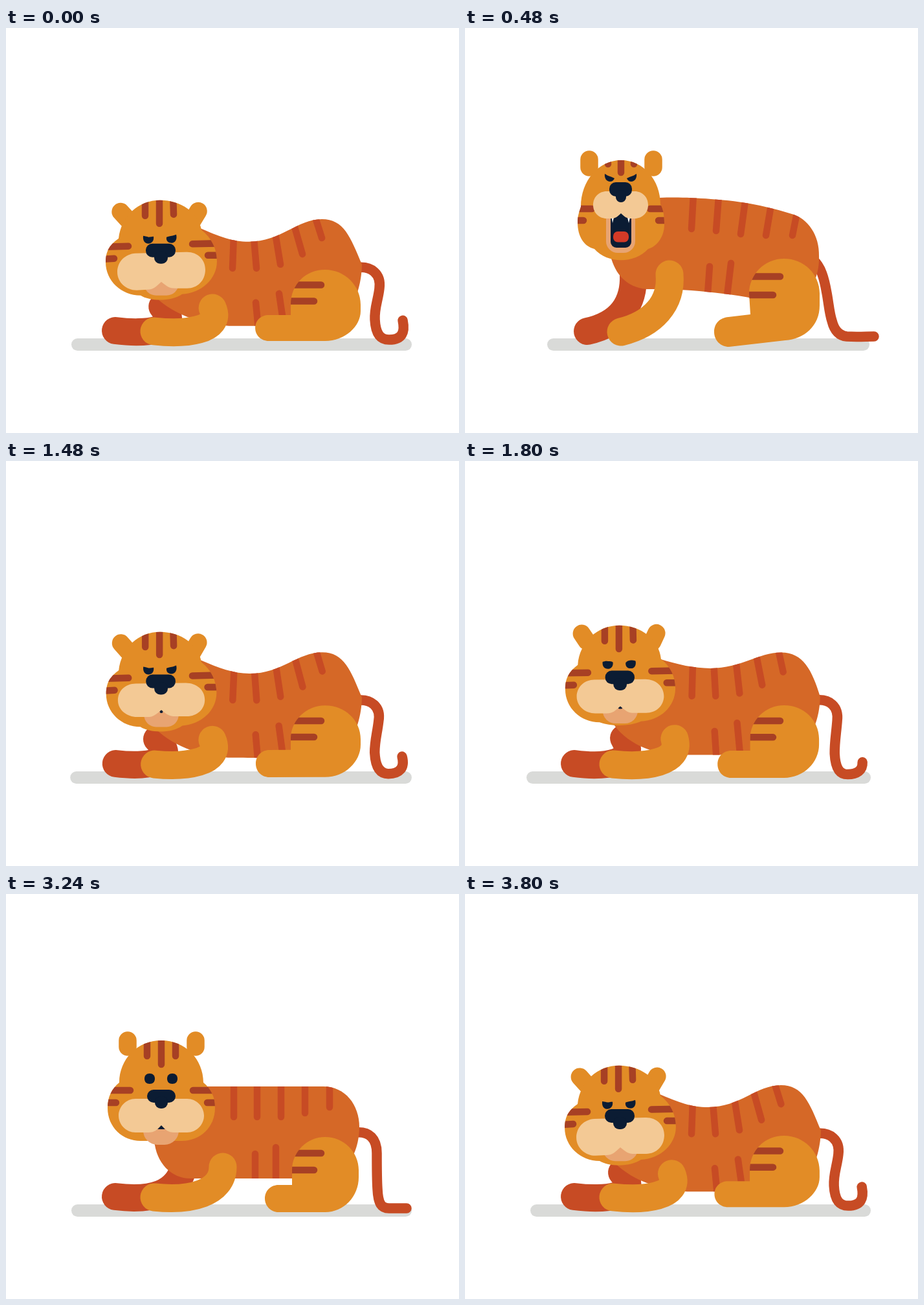
Animation of 700x625 px, one loop 3840 ms. Source, as an HTML page with a canvas:

```html
<!DOCTYPE html>
<html lang="en">
<head>
<meta charset="utf-8">
<title>Tiger</title>
<style>
html, body { margin: 0; overflow: hidden; background: #fff; }
canvas { display: block; }
</style>
</head>
<body>
<canvas id="stage" width="700" height="625"></canvas>
<script>
const ctx = document.getElementById('stage').getContext('2d');
const LOOP = 3840;
const FUR = '#e28c26', BODY = '#d56827', RED = '#c74b24', STRIPE = '#a74024', NAVY = '#0b1c33', TONGUE = '#d33a27';

// Every shape lists its poses: crouch, roar, roar with raised chest, rest,
// and optionally rest with ears out and the landing crouch.
// "M..." is a path, plain numbers are a rounded box: x y width height radius.
const FALLBACK = [0, 1, 2, 3, 3, 0];
const body = [
  'M230 300L300 309C330 322 350 330 375 330C425 330 450 295 488 295C522 295 532 322 550 365C550 390 540 460 480 460C440 460 380 460 345 460C290 456 245 435 222 405Z',
  'M230 262L300 262C330 261 350 262 380 264C430 267 470 276 505 287C530 294 548 320 547 352C548 375 540 425 480 425C420 409 340 402 280 403C250 400 232 380 225 352Z',
  'M230 235L300 251C335 257 370 264 405 273C440 282 475 292 510 303C530 309 547 333 547 360C548 380 540 432 480 440C430 427 350 406 285 394C255 388 238 372 228 348Z',
  'M230 297L300 297C330 297 360 297 390 297C430 297 460 297 490 297C524 297 546 325 546 360C546 385 535 439 480 439C420 439 350 439 285 439C255 439 232 415 229 380Z'];
const bodyStripes = [
  'M352 320L350 371M383 325L387 371M416 317L424 365M445 304L458 349M477 290L488 324M386 424L390 465M422 410L428 450',
  'M353 257L350 310M392 260L388 313M433 267L426 318M473 273L465 320M513 285L506 320M378 368L375 410M411 363L405 413',
  'M371 259L358 312M408 267L395 320M443 277L431 328M482 289L470 335M519 300L509 336M378 374L370 415M411 373L401 422',
  'M352 292L352 344M388 292L388 344M425 292L425 344M462 292L462 338M500 292L500 329M385 401L385 444M417 391L417 444'];
const thigh = [
  'M440 443L440 426C440 396 463 373 493 373C524 373 548 398 548 427L548 437C548 460 524 483 493 483L406 483C394 483 385 474 385 463C385 451 394 443 406 443Z',
  'M441 442L439 410C439 380 463 356 493 356C524 356 548 380 548 410L548 428C548 460 524 480 495 482L408 492C395 492 385 482 385 469C385 456 394 447 407 446Z',
  'M441 441L439 413C439 383 463 359 493 359C524 359 548 383 548 413L548 428C548 460 524 480 495 482L408 489C395 489 385 480 385 467C385 454 394 445 407 444Z',
  'M442 449L442 426C442 398 465 375 493 375C522 375 545 398 545 426L545 437C545 467 522 491 493 491L421 491C409 491 400 481 400 470C400 458 409 449 421 449Z',
  ,
  'M440 446L440 429C440 401 464 378 493 378C524 378 548 401 548 430L548 438C548 464 524 488 493 488L407 488C395 488 386 479 386 467C386 455 395 446 407 446Z'];
const thighStripes = [
  'M430 396.5L487 396.5M430 421.5L476 421.5',
  'M430 383.5L487 383.5M430 412L476 412',
  'M430 385.5L487 385.5M430 413.5L476 413.5',
  'M430 400L487 400M430 426L476 426',
  ,
  'M430 401.5L487 401.5M430 426.5L476 426.5'];
const farLeg = [
  'M169 467C215 473 275 468 241 430',
  'M189 468C240 457 262 425 260 380',
  'M193 467C240 457 264 425 261 375',
  'M169 467C225 474 265 463 275 420',
  ,
  'M169 467C215 473 270 468 232 431'];
const nearLeg = [
  'M229 468C275 473 335 468 319 432',
  'M241 469C290 457 320 425 316 380',
  'M248 469C290 460 320 425 316 380',
  'M229 468C285 474 335 462 335 421'];
const tail = [
  'M540 370C565 366 580 380 577 402C575 420 569 432 570 450C571 470 577 481 592 481C612 481 617 470 613 451',
  'M538 358C550 368 555 386 559 409C562 425 563 440 567 452C571 468 579 475 590 476C605 477 620 476 632 476',
  'M540 357C562 358 571 372 567 398C564 415 560 430 561 448C562 465 568 475 585 476C600 476 608 470 613 459',
  'M540 368C562 366 573 378 573 400C573 420 573 440 574 455C575 478 580 485 592 485C600 485 610 485 619 485',
  ,
  'M540 370C565 366 580 380 576 402C574 420 570 432 570 450C571 470 577 483 591 483C608 483 617 474 612 456'];
const ground = ['101 479 526 19 9.5', '127 479 498 19 9.5', '135 479 490 19 9.5', '101 479 526 19 9.5'];
const ears = [
  'M177 284L188 296M297 283L288 298',
  'M192 203L192 215M291 203L291 215',
  'M193 196L193 208M291 196L291 208',
  'M188 226L188 236M293 226L293 236',
  'M179 230L186 238M302 230L295 238'];
const head = [
  'M174 325C178 290 205 266 238 266C270 266 298 285 302 312C318 324 326 342 326 360C326 388 302 409 272 411C255 423 222 422 208 413C178 413 154 390 154 362C154 342 162 334 174 325Z',
  'M179 276C179 235 207 204 241 204C276 204 302 235 302 272C307 280 308 292 308 303C308 322 297 337 283 341C262 364 220 364 200 341C184 337 174 322 174 300C174 290 176 285 179 276Z',
  'M181 268C181 230 208 197 241 197C275 197 301 230 301 265C305 275 307 285 307 297C307 316 297 329 285 335C262 357 222 357 200 335C184 329 176 313 176 294C176 285 178 278 181 268Z',
  'M175 291C175 255 203 226 240 226C277 226 305 255 305 291C317 301 323 313 323 330C323 360 300 381 272 381C250 381 230 381 208 381C180 381 157 360 157 330C157 313 163 301 175 291Z'];
const headStripes = [
  'M215 255L215 290M237 255L237 302M258 255L259 288M150 338L189 337M150 357L167 356M288 333.5L330 332.5M312 351L330 351',
  'M220 194L221 210M241 194L241 223M262 194L261 210M170 279L196 279M170 297L183 297M286 279L312 279M299 297L312 297',
  'M221 187L221 204M241 187L241 216M262 187L262 204M170 271L196 271M170 290L185 290M286 271L312 271M298 290L312 290',
  'M218 216L218 250M240 216L240 263M262 216L262 250M150 303L192 303M150 322L170 322M289 303L330 303M311 322L330 322'];
const chin = ['213 375 54 38 19', '218 270 45 77 18', '219 260 44 80 18', '212 340 55 47 22'];
const mouth = ['238 385 4 6 2', '225 276 32 63 9', '226 266 31 67 9', '233 352 14 11 3'];
const tongue = ['238 380 4 4 2', '229 314 24 16.5 7', '231 299 21 22 8', '236 346 8 6 3'];
const teeth = [
  'M238 385L239 385L239 386ZM241 385L242 385L241 386Z',
  'M226 288L231 288L228 301ZM250 288L256 288L253 301Z',
  'M226 277L231 277L228 291ZM251 277L256 277L254 291Z',
  'M238 350L239 350L239 351ZM241 350L242 350L241 351Z'];
const muzzle = [
  'M240 392C231 400 228 404 218 404L202 405C186 405 172 393 172 377C172 361 184 349 200 348L278 346C295 345 308 357 308 373C308 390 296 402 280 402L262 402C252 402 249 399 240 392Z',
  'M241 286C236 291 232 294 226 294L219 294C207 294 198 285 198 273C198 261 207 252 219 252L262 252C274 252 283 261 283 273C283 285 274 294 262 294L256 294C250 294 246 291 241 286Z',
  'M241 274C236 280 232 282 226 282L219 282C208 282 199 273 199 262C199 251 208 243 219 243L264 243C275 243 284 251 284 262C284 273 275 282 264 282L256 282C250 282 246 280 241 274Z',
  'M240 357C233 364 230 368 220 368L200 368C186 368 174 356 174 342C174 328 186 316 200 316L280 316C294 316 306 328 306 342C306 356 294 368 280 368L260 368C250 368 247 364 240 357Z',
  ,
  'M240 388C231 395 228 399 218 399L202 399C186 399 172 388 172 373C172 358 184 347 200 347L278 346C295 346 308 357 308 372C308 387 296 398 280 398L262 398C252 398 249 395 240 388Z'];
const nose = ['216 333 46 21 10', '223 238 35 22 10', '224 230 35 20 9', '218 302 44 20 10'];
const noseTip = ['229 345 21 19 9', '233 250 16 19 8', '233 241 16 18 8', '230 312 20 19 9'];
const leftEye = [
  'M212 321C216 322 218 322 220 323C223 323 226 322 228 322C229 329 225 333 220 333C215 333 211 329 212 321Z',
  'M216 225C219 227 221 228 224 229C227 230 229 231 231 232C230 235 227 237 224 237C219 237 215 232 216 225Z',
  'M217 219C220 221 222 222 225 223C228 224 230 225 232 226C231 229 228 231 225 231C220 231 216 226 217 219Z',
  'M214 285C214 280 217 277 222 277C227 277 230 280 230 285C230 290 227 293 222 293C217 293 214 290 214 285Z'];
const rightEye = [
  'M263 319C260 320 258 321 256 321C252 322 250 322 248 323C247 329 251 332 256 332C261 332 265 327 263 319Z',
  'M265 225C262 227 260 228 257 229C254 230 252 231 250 232C251 235 254 237 257 237C262 237 266 232 265 225Z',
  'M265 219C262 221 260 222 257 223C254 224 252 225 250 226C251 229 254 231 257 231C262 231 266 226 265 219Z',
  'M265 285C265 280 262 277 257 277C252 277 249 280 249 285C249 290 252 293 257 293C262 293 265 290 265 285Z'];

// [time, pose]
const keys = [[40, 0], [120, 0], [450, 1], [560, 1], [1000, 2], [1220, 2], [1520, 5], [2240, 3],
  [2420, 3], [2600, 4], [2800, 3], [3240, 3], [3880, 0]];

const ease = u => u < .5 ? 2 * u * u : 1 - 2 * (1 - u) ** 2;
const bump = (t, from, to) => t > from && t < to ? Math.sin(Math.PI * (t - from) / (to - from)) : 0;

function mix(a, b, k) {
  const target = b.match(/[\d.]+/g);
  let i = 0;
  return a.replace(/[\d.]+/g, v => (+v + (target[i++] - v) * k).toFixed(2));
}

function shape(poses, now) {
  const pick = i => poses[i] ?? poses[FALLBACK[i]];
  const s = mix(pick(now.from), pick(now.to), now.k);
  if (s[0] === 'M') return new Path2D(s);
  const path = new Path2D();
  path.roundRect(...s.split(' ').map(Number));
  return path;
}

function draw(t) {
  if (t < keys[0][0]) t += LOOP;
  const next = keys.findIndex(key => key[0] > t);
  const [t0, from] = keys[next - 1], [t1, to] = keys[next];
  const now = { from, to, k: ease((t - t0) / (t1 - t0)) };

  const fill = (poses, color) => {
    ctx.fillStyle = color;
    ctx.fill(shape(poses, now));
  };
  const stroke = (poses, color, width, clip) => {
    ctx.save();
    if (clip) ctx.clip(shape(clip, now));
    ctx.strokeStyle = color;
    ctx.lineWidth = width;
    ctx.stroke(shape(poses, now));
    ctx.restore();
  };

  ctx.fillStyle = '#fff';
  ctx.fillRect(0, 0, 700, 625);
  ctx.lineCap = 'round';

  fill(ground, '#d9dad8');
  const stretch = 6 * bump(t, 1400, 2240);
  if (stretch) {
    ctx.beginPath();
    ctx.roundRect(101 - stretch, 479, 60, 19, 9.5);
    ctx.fill();
  }

  stroke(tail, RED, 15.5);
  stroke(farLeg, RED, 42);
  fill(body, BODY);
  stroke(bodyStripes, RED, 10.5, body);
  fill(thigh, FUR);
  stroke(thighStripes, STRIPE, 10.5, thigh);
  stroke(nearLeg, FUR, 43);

  stroke(ears, FUR, 27.5);
  fill(head, FUR);
  stroke(headStripes, STRIPE, 10.5, head);
  fill(chin, '#e8a472');
  fill(mouth, NAVY);
  fill(tongue, TONGUE);
  const lick = bump(t, 2360, 2800);
  if (lick) {
    ctx.beginPath();
    ctx.roundRect(240, 346, 18, 8 + 22 * lick, 8);
    ctx.fill();
  }
  fill(teeth, '#fff');
  fill(muzzle, '#f3c995');
  fill(nose, NAVY);
  fill(noseTip, NAVY);
  fill(leftEye, NAVY);
  fill(rightEye, NAVY);
}

const start = performance.now();
function frame() {
  draw((performance.now() - start) % LOOP);
  requestAnimationFrame(frame);
}
frame();
</script>
</body>
</html>
```
